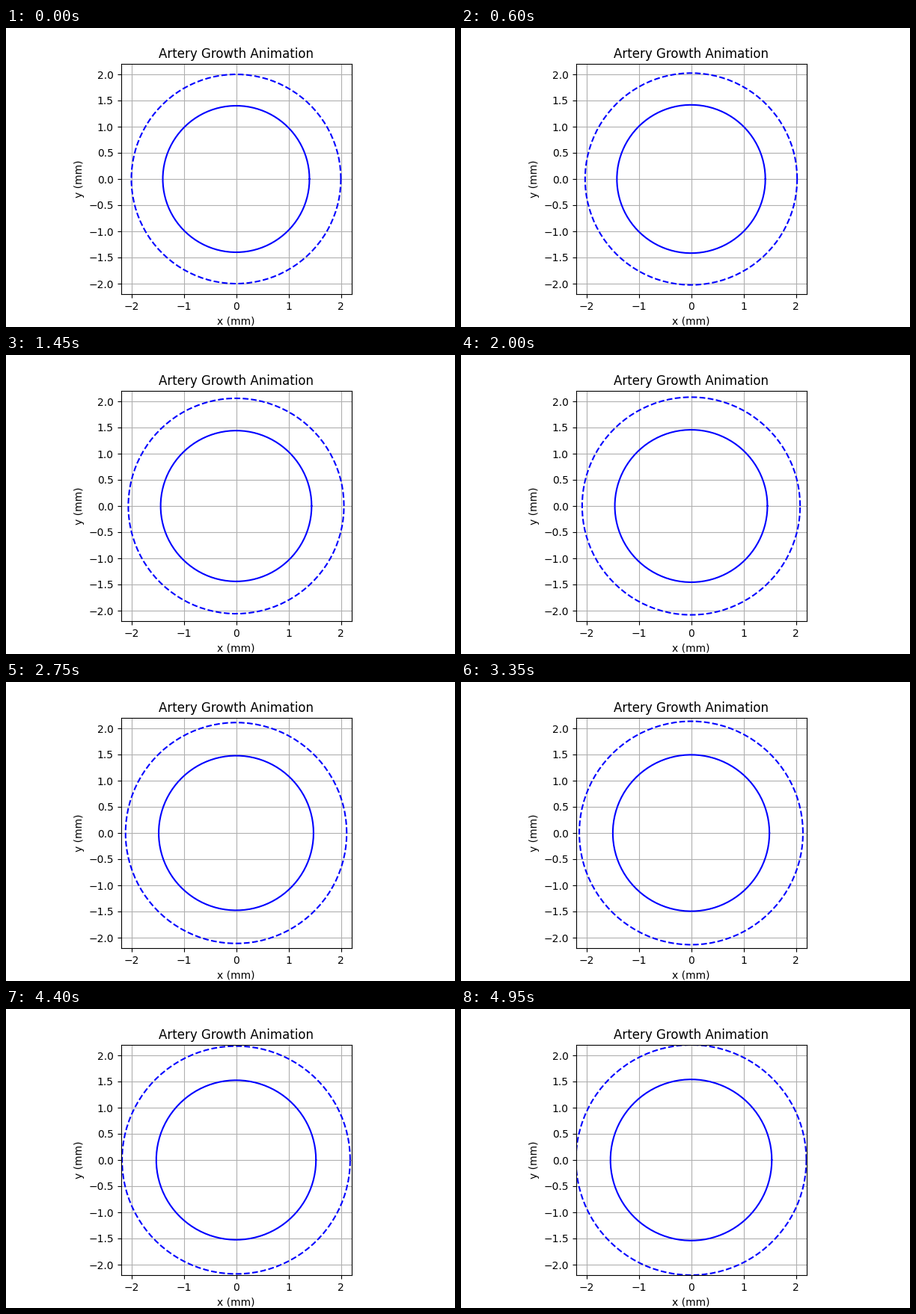
Write a matplotlib script that moves like this. It is 600 px wide and 400 px high and loops after 5000 ms.

```python
import numpy as np
import matplotlib.pyplot as plt
from matplotlib.animation import FuncAnimation

FRAMES = 100
INNER, OUTER = 1.4, 2.0   # starting radii in mm
GROWTH = 0.1              # relative growth over one loop
LIMIT = 2.2

theta = np.linspace(0, 2 * np.pi, 100)
unit_x, unit_y = np.cos(theta), np.sin(theta)

fig, ax = plt.subplots(figsize=(6, 4), dpi=100)
ax.set_xlim(-LIMIT, LIMIT)
ax.set_ylim(-LIMIT, LIMIT)
ax.set_aspect("equal")
ax.set_title("Artery Growth Animation")
ax.set_xlabel("x (mm)")
ax.set_ylabel("y (mm)")
ax.grid(True)

inner_wall, = ax.plot([], [], "b-")
outer_wall, = ax.plot([], [], "b--")


def update(frame):
    scale = 1 + GROWTH * frame / (FRAMES - 1)
    for wall, radius in ((inner_wall, INNER), (outer_wall, OUTER)):
        wall.set_data(radius * scale * unit_x, radius * scale * unit_y)
    return inner_wall, outer_wall


def init():
    return update(0)


anim = FuncAnimation(fig, update, frames=FRAMES, init_func=init,
                     interval=50, repeat=True, repeat_delay=0)
plt.show()
```
